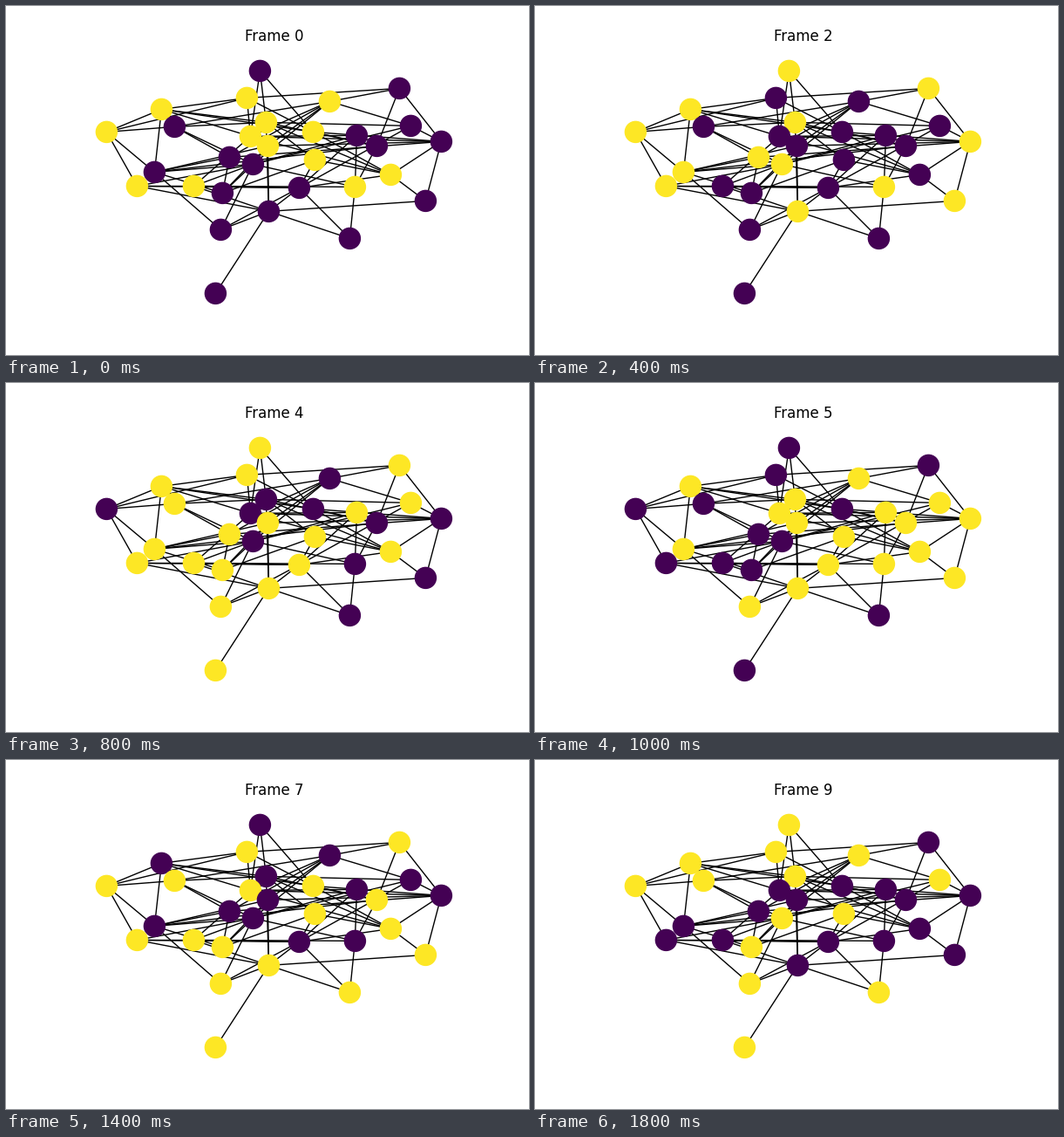
A matplotlib script for the animation above (2000 ms loop, 600 by 400 pixels).

```python
import numpy as np
import matplotlib.pyplot as plt
from matplotlib.animation import FuncAnimation
from matplotlib.collections import LineCollection

OFF, ON = "#440154", "#fde725"

# Node centres in stage pixels, y downwards.
NODES = np.array([
    (291, 74), (451, 94), (276, 105), (371, 109), (178, 118), (193, 138),
    (115, 144), (298, 133), (280, 149), (300, 160), (352, 144), (402, 148),
    (464, 137), (425, 160), (499, 155), (256, 173), (283, 181), (354, 176),
    (170, 190), (150, 206), (215, 206), (248, 214), (336, 208), (400, 207),
    (441, 193), (301, 235), (481, 223), (246, 256), (394, 266), (240, 329),
]) + 0.4

# Neighbours of each node, every edge listed once.
LINKS = {
    0: (7, 8, 10),
    1: (2, 3, 13, 14),
    2: (4, 6, 8, 10),
    3: (8, 9, 12, 15, 16),
    4: (6, 7, 8, 10, 18),
    5: (3, 6, 7, 15, 16),
    6: (18, 19),
    7: (12, 13, 17, 24, 25),
    8: (11, 14, 20, 24),
    9: (14, 18, 25),
    10: (13, 14, 24),
    11: (16, 22, 23),
    12: (14, 16, 22),
    13: (18, 23),
    14: (15, 24, 26),
    15: (18, 21),
    16: (18, 19, 20, 21, 23, 27),
    17: (21, 22, 24),
    18: (21, 27),
    19: (20, 22, 25),
    20: (22, 25),
    21: (9,),
    22: (24, 25, 27, 28),
    23: (20, 28),
    24: (26,),
    25: (26, 27, 28, 29),
}

# Nodes that are switched on at each step.
ACTIVE = [
    {2, 3, 4, 6, 7, 8, 9, 10, 17, 19, 20, 23, 24},
    {0, 2, 4, 6, 7, 8, 10, 12, 13, 16, 17, 23, 25, 26},
    {0, 1, 4, 6, 7, 14, 15, 16, 18, 19, 23, 25, 26},
    {3, 5, 7, 8, 9, 11, 12, 22, 24},
    set(range(30)) - {3, 6, 7, 8, 10, 13, 14, 16, 23, 26, 28},
    {3, 4, 7, 8, 9, 11, 12, 13, 14, 17, 18, 22, 23, 24, 25, 26, 27},
    {1, 4, 6, 8, 9, 10, 11, 13, 17, 21, 24, 25, 27, 28, 29},
    set(range(30)) - {0, 3, 4, 7, 9, 11, 12, 14, 15, 16, 18, 22, 23},
    {0, 2, 4, 5, 6, 7, 8, 10, 13, 17, 21, 24, 28},
    {0, 2, 3, 4, 5, 6, 7, 12, 16, 17, 21, 27, 28, 29},
]

fig, ax = plt.subplots(figsize=(6, 4), dpi=100)
fig.subplots_adjust(left=0.125, right=0.9, bottom=0.11, top=0.88)
ax.set_xlim(75, 540)
ax.set_ylim(356, 48)
ax.axis("off")

edges = [(NODES[a], NODES[b]) for a, near in LINKS.items() for b in near]
ax.add_collection(LineCollection(edges, colors="black", linewidths=1, zorder=1),
                  autolim=False)
dots = ax.scatter(*NODES.T, s=300, linewidths=1, zorder=2)
title = ax.set_title("", fontsize=12, fontfamily="DejaVu Sans")


def update(step):
    colors = [ON if n in ACTIVE[step] else OFF for n in range(len(NODES))]
    dots.set_facecolor(colors)
    dots.set_edgecolor(colors)
    title.set_text(f"Frame {step}")
    return dots, title


anim = FuncAnimation(fig, update, frames=len(ACTIVE), interval=200,
                     repeat=True, repeat_delay=0, blit=False)
plt.show()
```
